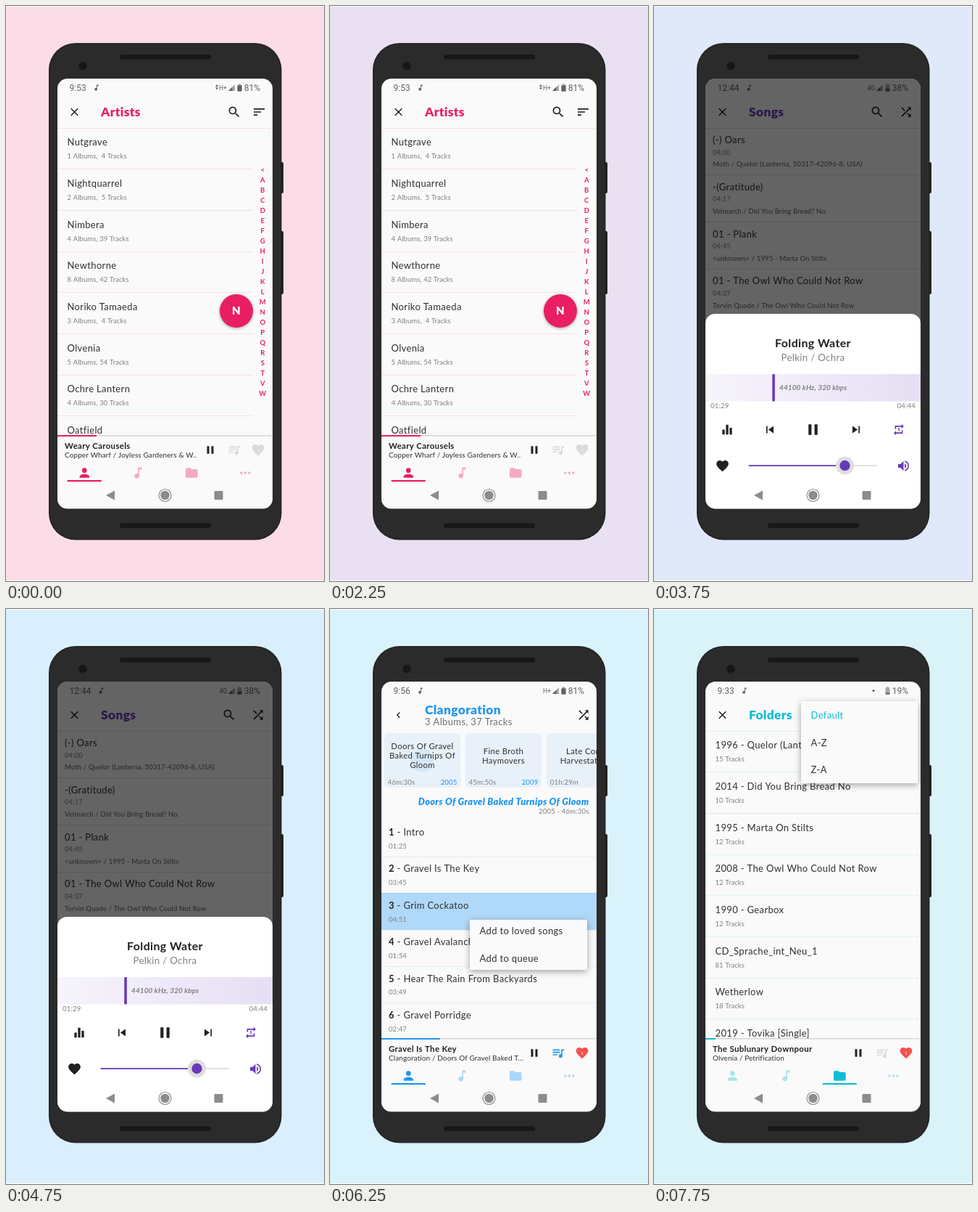
Animation, 439 px wide and 792 px high, one loop 8 s. Source, as an HTML page with a canvas:

```html
<!DOCTYPE html>
<html lang="en">
<head>
<meta charset="utf-8">
<title>Music player themes</title>
<style>
  html, body { margin: 0; width: 100%; height: 100%; overflow: hidden; }
  canvas { display: block; width: 439px; height: 792px; }
</style>
</head>
<body>
<canvas id="stage" width="439" height="792"></canvas>
<script>
const ctx = document.getElementById('stage').getContext('2d');
const LOOP = 8000, SLOT = 2500;
const BACKDROPS = [[252, 221, 231], [231, 224, 243], [217, 241, 254], [217, 243, 248]];
const PINK = '#e91e63', PURPLE = '#673ab7', BLUE = '#2196f3', CYAN = '#12bcd4';
const INK = '#212121', BODY = '#303030', SOFT = '#808080', RED = '#f4514c', PAPER = '#fafafa';
const LEFT = 71, RIGHT = 368, TOP = 100, BOTTOM = 692.5;

const ICONS = {
  search: 'M15.5 14h-.79l-.28-.27A6.47 6.47 0 0 0 16 9.5 6.5 6.5 0 1 0 9.5 16c1.61 0 3.09-.59 4.23-1.57l.27.28v.79l5 4.99L20.49 19zm-6 0C7 14 5 12 5 9.5S7 5 9.5 5 14 7 14 9.5 12 14 9.5 14z',
  shuffle: 'M10.59 9.17L5.41 4 4 5.41l5.17 5.17zM14.5 4l2.04 2.04L4 18.59 5.41 20 17.96 7.46 20 9.5V4zm.33 9.41l-1.41 1.41 3.13 3.13L14.5 20H20v-5.5l-2.04 2.04z',
  sort: 'M3 18h6v-2H3zM3 6v2h18V6zm0 7h12v-2H3z',
  close: 'M19 6.41L17.59 5 12 10.59 6.41 5 5 6.41 10.59 12 5 17.59 6.41 19 12 13.41 17.59 19 19 17.59 13.41 12z',
  back: 'M15.41 7.41L14 6l-6 6 6 6 1.41-1.41L10.83 12z',
  person: 'M12 12a4 4 0 1 0 0-8 4 4 0 0 0 0 8zm0 2c-2.67 0-8 1.34-8 4v2h16v-2c0-2.66-5.33-4-8-4z',
  note: 'M12 3v10.55A4 4 0 1 0 14 17V7h4V3z',
  folder: 'M10 4H4c-1.1 0-2 .9-2 2v12c0 1.1.9 2 2 2h16c1.1 0 2-.9 2-2V8c0-1.1-.9-2-2-2h-8z',
  queue: 'M15 6H3v2h12zm0 4H3v2h12zM3 16h8v-2H3zM17 6v8.18A3 3 0 1 0 19 17V8h3V6z',
  heart: 'M12 21.35l-1.45-1.32C5.4 15.36 2 12.28 2 8.5 2 5.42 4.42 3 7.5 3c1.74 0 3.41.81 4.5 2.09C13.09 3.81 14.76 3 16.5 3 19.58 3 22 5.42 22 8.5c0 3.78-3.4 6.86-8.55 11.54z',
  repeat: 'M7 7h10v3l4-4-4-4v3H5v6h2zm10 10H7v-3l-4 4 4 4v-3h12v-6h-2zm-4-2V9h-1l-2 1v1h1.5v4z',
  volume: 'M3 9v6h4l5 5V4L7 9zm13.5 3c0-1.77-1-3.29-2.5-4v8c1.48-.73 2.5-2.25 2.5-4zM14 3.23v2.06a7 7 0 0 1 0 13.42v2.06a9 9 0 0 0 0-17.54z',
  prev: 'M6 6h2v12H6zm3.5 6l8.5 6V6z',
  next: 'M6 18l8.5-6L6 6zM16 6v12h2V6z',
  bars: 'M10 20h4V4h-4zm-6 0h4v-8H4zM16 9v11h4V9z',
  pause: 'M6 19h4V5H6zm8-14v14h4V5z'
};
for (const name in ICONS) ICONS[name] = new Path2D(ICONS[name]);

function icon(name, cx, cy, size, color) {
  ctx.save();
  ctx.translate(cx - size / 2, cy - size / 2);
  ctx.scale(size / 24, size / 24);
  ctx.fillStyle = color;
  ctx.fill(ICONS[name]);
  ctx.restore();
}

function box(x, y, w, h, color, radius = 0) {
  ctx.fillStyle = color;
  ctx.beginPath();
  ctx.roundRect(x, y, w, h, radius);
  ctx.fill();
}

function disc(x, y, r, color) {
  ctx.fillStyle = color;
  ctx.beginPath();
  ctx.arc(x, y, r, 0, 7);
  ctx.fill();
}

function shape(color, ...points) {
  ctx.fillStyle = color;
  ctx.beginPath();
  points.forEach(p => ctx.lineTo(...p));
  ctx.fill();
}

function text(str, x, y, size, color = BODY, style = '400', align = 'left') {
  ctx.font = `${style} ${size}px Lato, sans-serif`;
  ctx.letterSpacing = size > 11 ? '0.35px' : '0.1px';
  ctx.textAlign = align;
  ctx.fillStyle = color;
  ctx.fillText(str, x, y);
  return ctx.measureText(str).width;
}

function statusText(str, x, y, size, align = 'left') {
  ctx.font = `400 ${size}px Roboto, sans-serif`;
  ctx.letterSpacing = '0px';
  ctx.textAlign = align;
  ctx.fillStyle = '#616161';
  ctx.fillText(str, x, y);
}

function raised(blur, draw) {
  ctx.save();
  ctx.shadowColor = 'rgba(0,0,0,.35)';
  ctx.shadowBlur = blur;
  ctx.shadowOffsetY = blur / 4;
  draw();
  ctx.restore();
}

function clipped(bottom, draw) {
  ctx.save();
  ctx.beginPath();
  ctx.rect(LEFT, TOP, RIGHT - LEFT, bottom - TOP);
  ctx.clip();
  draw();
  ctx.restore();
}

const divider = (y, color, right = RIGHT) => {
  ctx.globalAlpha = .12;
  box(LEFT, y, right - LEFT, 1, color);
  ctx.globalAlpha = 1;
};

function drawPhone() {
  box(376, 215, 7, 43, '#222', 2);
  box(376, 310, 7, 87, '#222', 2);
  box(59, 51, 321.5, 684.5, '#242424', 37);
  box(60.5, 52.5, 318.5, 681.5, '#2b2b2b', 36);
  box(157, 67, 126, 6.5, '#171717', 3.2);
  box(157, 712.5, 126, 6.5, '#171717', 3.2);
  disc(106, 82.5, 5.8, '#171717');
}

function drawStatus(time, noteX, battery, network, networkX) {
  const gray = '#616161', pale = '#a8a8a8';
  statusText(time, 87.5, 117, 12);
  icon('note', noteX, 112.5, 11, gray);
  statusText(battery, 351, 117, 12, 'right');
  const charge = 10 * parseInt(battery) / 100;
  box(319.5, 108.5, 6, 9, pale, 1);
  box(321, 107.3, 3, 2, pale);
  box(319.5, 117.5 - charge, 6, charge, gray);
  if (!network) return disc(303, 112.5, 1.6, gray);
  statusText(network, networkX, 115.5, 8.5);
  shape(pale, [307, 117], [316, 117], [316, 108]);
  shape(gray, [307, 117], [312.5, 117], [312.5, 111.5]);
}

function drawHeader(title, color, lead, actions) {
  icon(lead, 94.5, 146, lead === 'close' ? 18 : 16, INK);
  text(title, 131, lead === 'close' ? 151.5 : 144.5, 17.4, color, '900');
  actions.forEach(([name, x]) => icon(name, x, 146, 20, INK));
}

function drawNav() {
  const gray = '#8c8c8c';
  shape(gray, [138, 674], [150, 667.5], [150, 680.5]);
  disc(219.5, 674, 6.2, gray);
  ctx.strokeStyle = gray;
  ctx.lineWidth = 1.2;
  ctx.beginPath();
  ctx.arc(219.5, 674, 8.5, 0, 7);
  ctx.stroke();
  box(287.5, 668, 12, 12, gray, 1);
}

function drawMiniPlayer(color, track, artist, progress, tab, queued, loved) {
  box(LEFT, 591, RIGHT - LEFT, BOTTOM - 591, PAPER);
  box(LEFT, 591, RIGHT - LEFT, 1.6, '#d6d6d6');
  box(LEFT, 591, progress - LEFT, 2, color);
  text(track, 81, 610, 11.4, INK, '700');
  text(artist, 81, 621.5, 10, BODY);
  icon('pause', 282, 611.5, 18, INK);
  icon('queue', 315, 611.5, 20, queued ? color : '#d8d8d8');
  icon('heart', 348, 611.5, 20, loved ? RED : '#dadada');
  text('1', 348, 613.5, 6, PAPER, '400', 'center');

  ['person', 'note', 'folder', 'dots'].forEach((name, i) => {
    const x = 108.3 + i * 74;
    ctx.globalAlpha = i === tab ? 1 : .36;
    if (name === 'dots') [-5.5, 0, 5.5].forEach(d => disc(x + d, 643, 1.7, color));
    else icon(name, x, 643, 20, color);
    ctx.globalAlpha = 1;
  });
  box(84.5 + tab * 74, 653, 47.5, 2.2, color, 1);
  drawNav();
}

function drawTwoLineList(rows, color, right) {
  clipped(591, () => {
    divider(168, color);
    rows.forEach(([title, detail], i) => {
      const y = i * 56.65;
      text(title, 84.5, 192.3 + y, 13);
      text(detail, 84.5, 210.3 + y, 9.5, SOFT);
      divider(Math.round(224.3 + y), i === 1 ? '#444' : color, right);
    });
  });
}

function drawMenu(x, y, w, h, items, color = BODY) {
  raised(10, () => box(x, y, w, h, PAPER, 1));
  const first = y + (items.length > 2 ? 24 : 20);
  items.forEach((item, i) =>
    text(item, x + 13.5, first + i * 37.5, 13, i ? BODY : color));
}

function artists() {
  drawStatus('9:53', 125, '81%', 'H+', 294);
  shape('#616161', [289, 111], [291, 108], [293, 111]);
  shape('#616161', [289, 112.3], [291, 115.3], [293, 112.3]);
  drawHeader('Artists', PINK, 'close', [['search', 315], ['sort', 349.5]]);
  drawTwoLineList([
    ['Nutgrave', '1 Albums,  4 Tracks'],
    ['Nightquarrel', '2 Albums,  5 Tracks'],
    ['Nimbera', '4 Albums, 39 Tracks'],
    ['Newthorne', '8 Albums, 42 Tracks'],
    ['Noriko Tamaeda', '3 Albums,  4 Tracks'],
    ['Olvenia', '5 Albums, 54 Tracks'],
    ['Ochre Lantern', '4 Albums, 30 Tracks'],
    ['Oatfield', '']
  ], PINK, 341);
  [...'<ABCDEFGHIJKLMNOPQRSTVW'].forEach((letter, i) =>
    text(letter, 354.3, 229 + i * 14.02, 9.5, PINK, '700', 'center'));
  raised(4, () => disc(318, 420, 23, PINK));
  text('N', 318, 425.2, 15, '#fff', '900', 'center');
  drawMiniPlayer(PINK, 'Weary Carousels', 'Copper Wharf / Joyless Gardeners & W..', 125, 0, false, false);
}

function songs() {
  drawStatus('12:44', 131.5, '38%', '4G', 294.5);
  drawHeader('Songs', PURPLE, 'close', [['search', 308], ['shuffle', 348]]);
  divider(168, INK);
  [
    ['(-) Oars', '04:00', 'Moth / Quelor (Lanterna, 50317-42096-8, USA)'],
    ['-(Gratitude)', '04:17', 'Velmarch / Did You Bring Bread? No.'],
    ['01 - Plank', '04:45', '<unknown> / 1995 - Marta On Stilts'],
    ['01 - The Owl Who Could Not Row', '04:37', 'Torvin Quade / The Owl Who Could Not Row']
  ].forEach(([title, length, detail], i) => {
    const y = i * 64.8;
    text(title, 81, 189 + y, 13);
    text(length, 81, 204.5 + y, 9.5, SOFT);
    text(detail, 81, 221.3 + y, 9.6, '#606060');
    divider(Math.round(232 + y), INK);
  });
  box(LEFT, TOP, RIGHT - LEFT, BOTTOM - TOP, 'rgba(0,0,0,.6)');
  box(LEFT, 424, RIGHT - LEFT, 290, '#fff', 13);

  text('Folding Water', 219.5, 470, 16, INK, '700', 'center');
  text('Pelkin / Ochra', 219.5, 488.5, 13.2, SOFT, '400', 'center');
  const band = ctx.createLinearGradient(LEFT, 0, RIGHT, 0);
  band.addColorStop(0, '#f7f4fc');
  band.addColorStop(1, '#e6dff4');
  box(LEFT, 507, RIGHT - LEFT, 37.5, band);
  box(163.3, 507, 3.6, 37.5, PURPLE, 1);
  text('44100 kHz, 320 kbps', 173, 528.7, 10, SOFT, 'italic 700');
  text('01:29', 78, 553.5, 9.7, SOFT);
  text('04:44', 361, 553.5, 9.7, SOFT, '400', 'right');

  icon('bars', 101, 583.5, 20, INK);
  icon('prev', 160, 583.5, 20, INK);
  icon('pause', 219.5, 583.5, 25, INK);
  icon('next', 279, 583.5, 20, INK);
  icon('repeat', 338, 583.5, 18.5, PURPLE);
  icon('heart', 94.5, 633.5, 20, INK);
  box(130.5, 632.3, 178, 1.8, '#dcdcdc', 1);
  box(130.5, 632.3, 133, 1.8, PURPLE, 1);
  disc(263.5, 633, 12.5, '#dedede');
  disc(263.5, 633, 7.2, PURPLE);
  icon('volume', 344.5, 633.5, 20, PURPLE);
  drawNav();
}

function albumCard(x, lines, length, year) {
  box(x, 171, 106, 75, '#e8f1f9', 6);
  if (lines.length > 2) disc(x + 52.5, 208.5, 16, '#d5e8f8');
  lines.forEach((line, i) =>
    text(line, x + 53, 206.3 + (i - (lines.length - 1) / 2) * 13, 11.3, BODY, '400', 'center'));
  text(length, x + 5, 242, 9.7, SOFT);
  text(year, x + 101, 242, 9.7, BLUE, '400', 'right');
}

function album() {
  drawStatus('9:56', 125, '81%', 'H+', 294);
  drawHeader('Clangoration', BLUE, 'back', [['shuffle', 350]]);
  text('3 Albums, 37 Tracks', 131, 160, 13, '#707070');
  albumCard(74.5, ['Doors Of Gravel', 'Baked Turnips Of', 'Gloom'], '46m:30s', '2005');
  albumCard(186.5, ['Fine Broth', 'Haymovers'], '45m:50s', '2009');
  albumCard(298.8, ['Late Corn', 'Harvestation'], '01h:29m', '');
  text('Doors Of Gravel Baked Turnips Of Gloom', 357.5, 270, 12.8, BLUE, 'italic 900', 'right');
  text('2005 - 46m:30s', 357.5, 282, 9.7, SOFT, '400', 'right');

  clipped(591, () => {
    box(LEFT, 391, RIGHT - LEFT, 51, '#b0d8f8');
    [
      ['Intro', '01:25'], ['Gravel Is The Key', '03:45'], ['Grim Cockatoo', '04:51'],
      ['Gravel Avalanche Run', '01:54'], ['Hear The Rain From Backyards', '03:49'],
      ['Gravel Porridge', '02:47']
    ].forEach(([title, length], i) => {
      const y = i * 50.4;
      const w = text(String(i + 1), 81, 312 + y, 13, INK, '700');
      text(' - ' + title, 81 + w, 312 + y, 13);
      text(length, 81, 329.8 + y, 9.5, SOFT);
      divider(Math.round(340.7 + y), BLUE);
    });
  });
  drawMiniPlayer(BLUE, 'Gravel Is The Key', 'Clangoration / Doors Of Gravel Baked T...', 152, 0, true, true);
  drawMenu(193, 428, 162, 69, ['Add to loved songs', 'Add to queue']);
}

function folders() {
  drawStatus('9:33', 125, '19%');
  drawHeader('Folders', CYAN, 'close', []);
  drawTwoLineList([
    ['1996 - Quelor (Lanterna)', '15 Tracks'],
    ['2014 - Did You Bring Bread No', '10 Tracks'],
    ['1995 - Marta On Stilts', '12 Tracks'],
    ['2008 - The Owl Who Could Not Row', '12 Tracks'],
    ['1990 - Gearbox', '12 Tracks'],
    ['CD_Sprache_int_Neu_1', '81 Tracks'],
    ['Wetherlow', '18 Tracks'],
    ['2019 - Tovika [Single]', '']
  ], CYAN, RIGHT);
  drawMiniPlayer(CYAN, 'The Sublunary Downpour', 'Olvenia / Petrification', 85, 2, false, true);
  drawMenu(203, 127, 161.5, 113, ['Default', 'A-Z', 'Z-A'], CYAN);
}

const SCREENS = [artists, songs, album, folders];

function backdrop(time) {
  const i = Math.floor(time / SLOT);
  const from = BACKDROPS[i], to = BACKDROPS[Math.min(i + 1, 3)];
  const k = time % SLOT / SLOT;
  return `rgb(${from.map((c, n) => Math.round(c + (to[n] - c) * k))})`;
}

function render(now) {
  const time = now % LOOP;
  box(0, 0, 439, 792, '#fff');
  box(0, 1, 439, 790, backdrop(time));
  drawPhone();
  ctx.save();
  ctx.beginPath();
  ctx.roundRect(LEFT, TOP, RIGHT - LEFT, BOTTOM - TOP, 14);
  ctx.clip();
  box(LEFT, TOP, RIGHT - LEFT, BOTTOM - TOP, PAPER);
  SCREENS[Math.floor(time / SLOT)]();
  ctx.restore();
}

const start = performance.now();
function tick() {
  render(performance.now() - start);
  requestAnimationFrame(tick);
}
tick();
</script>
</body>
</html>
```
